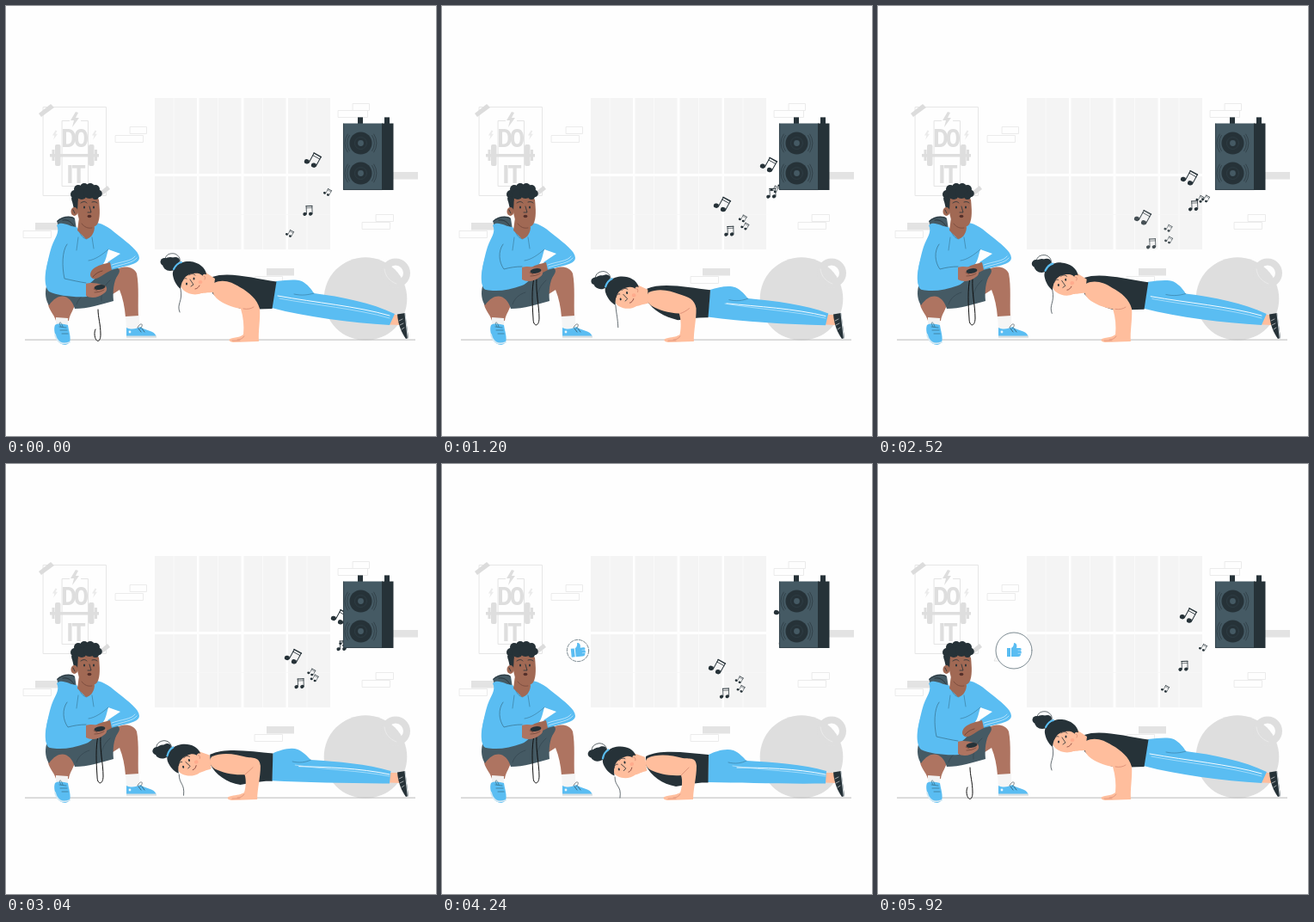
These frames come from a looping animation (500x500 px, 6 s). An HTML page with a canvas:

```html
<!DOCTYPE html>
<html lang="en">
<head>
<meta charset="utf-8">
<title>Workout</title>
<style>
html, body { margin: 0; width: 100%; height: 100%; overflow: hidden; background: #fefefe; }
canvas { display: block; width: 100vw; height: 100vh; }
</style>
</head>
<body>
<canvas id="stage"></canvas>
<script>
const LOOP = 6000, REP = 1100, REPS = 4, FIRST_REP = 395;
const BLUE = '#5abdf2', DARK = '#263238', SLATE = '#455a64', SKIN = '#ffbe9d';
const BROWN = '#ae7461', FACE = '#a16954', GREY = '#dedede', PALE = '#ebebeb';
const canvas = document.getElementById('stage');
const ctx = canvas.getContext('2d');

const lerp = (a, b, k) => a + (b - a) * k;
const clamp = v => Math.max(0, Math.min(1, v));
const ease = v => (1 - Math.cos(Math.PI * clamp(v))) / 2;

// value of a [time, value] track
function track(keys, t) {
  if (t <= keys[0][0]) return keys[0][1];
  for (let i = 1; i < keys.length; i++) {
    const [t0, v0] = keys[i - 1], [t1, v1] = keys[i];
    if (t <= t1) return lerp(v0, v1, (t - t0) / (t1 - t0));
  }
  return keys[keys.length - 1][1];
}

// blend two paths that share one structure
function mix(a, b, k) {
  const other = b.match(/-?[\d.]+/g);
  let i = 0;
  return a.replace(/-?[\d.]+/g, n => lerp(+n, +other[i++], k).toFixed(2));
}

function fill(d, color) {
  ctx.fillStyle = color;
  ctx.fill(new Path2D(d));
}

function line(d, color = DARK, w = 0.7) {
  ctx.strokeStyle = color;
  ctx.lineWidth = w;
  ctx.stroke(new Path2D(d));
}

function rect(x, y, w, h, color) {
  ctx.fillStyle = color;
  ctx.fillRect(x, y, w, h);
}

function box(x, y, w, h, color = PALE) {
  ctx.strokeStyle = color;
  ctx.lineWidth = 1;
  ctx.strokeRect(x + 0.5, y + 0.5, w, h);
}

function oval(x, y, rx, ry, color, rot = 0) {
  ctx.fillStyle = color;
  ctx.beginPath();
  ctx.ellipse(x, y, rx, ry, rot, 0, Math.PI * 2);
  ctx.fill();
}

function arc(x, y, r, color, w, a = 0, b = Math.PI * 2) {
  ctx.strokeStyle = color;
  ctx.lineWidth = w;
  ctx.beginPath();
  ctx.arc(x, y, r, a, b);
  ctx.stroke();
}

function at(x, y, rot, scale, draw) {
  ctx.save();
  ctx.translate(x, y);
  ctx.rotate(rot);
  ctx.scale(scale, scale);
  draw();
  ctx.restore();
}

function word(text, x, base, family) {
  ctx.font = `700 extra-condensed 28px ${family}, sans-serif`;
  ctx.letterSpacing = '-2.5px';
  ctx.textAlign = 'center';
  ctx.fillStyle = GREY;
  ctx.fillText(text, x, base);
  ctx.letterSpacing = '0px';
}

function bolt(x, y, s, color) {
  at(x, y, 0, s, () => fill('M1 -9 L-5 1 L-1 1 L-3 9 L5 -2 L1 -2 L4 -8 Z', color));
}

function room() {
  for (const y of [107, 198]) {
    const h = y < 150 ? 88 : 85;
    for (const x of [173, 224.5, 276.5, 328]) {
      rect(x, y, 49, h, '#f4f4f4');
      rect(x + 21.5, y, 1, h, '#fafafa');
    }
  }
  rect(173, 242, 204, 0.7, '#f8f8f8');
  for (const [x, y, w] of [[144, 140, 19], [127, 150, 32], [20, 261, 32], [403, 113, 19], [386, 121, 34],
    [430, 242, 20], [414, 251, 32], [289, 314, 32]]) box(x, y, w, 8);
  for (const [x, y, w] of [[34, 252, 27], [450, 193, 29], [303, 305, 32]]) rect(x, y, w, 8.5, '#e3e3e3');

  box(43, 117, 73, 103, '#e6e6e6');
  fill('M38 125 L52 114 L56 118 L41 129 Z', '#dcdcdc');
  fill('M108 217 L118 209 L121 213 L112 220 Z', '#dcdcdc');
  box(65, 133, 30, 76, '#e4e4e4');
  rect(74, 126, 13, 14, '#fefefe');
  bolt(80, 132, 1, GREY);
  bolt(57, 150, 0.6, PALE);
  bolt(103, 150, 0.6, PALE);
  word('DO', 79, 163.5, '"Noto Sans Mono"');
  word('IT', 80, 206, '"Open Sans"');
  rect(51, 172, 57, 3.5, GREY);
  for (const x of [57, 96]) {
    ctx.fillStyle = GREY;
    ctx.beginPath();
    ctx.roundRect(x, 161, 6.5, 25, 2);
    ctx.fill();
  }
  rect(53.5, 167, 3, 13, GREY);
  rect(103, 167, 3, 13, GREY);

  oval(418, 340.5, 48.3, 48.3, GREY);
  arc(453, 310.5, 13, GREY, 8);
  line('M440 306 C441 314 446 320 454 323', '#ececec', 0.8);
  rect(22, 387.6, 454, 1, '#b9b9b9');
}

function speaker() {
  rect(409, 129.4, 6, 9, DARK);
  rect(440, 129.4, 6, 9, DARK);
  rect(392, 136.5, 46, 77.5, SLATE);
  rect(437, 136.5, 13.5, 77.5, DARK);
  line('M392.4 137 V213.6 H437', DARK, 0.6);
  for (const y of [159.5, 194.5]) {
    oval(412.5, y, 13, 13, DARK);
    arc(412.5, y, 7, '#303f47', 0.8);
    oval(412.5, y, 3.4, 3.4, SLATE);
    for (const r of [16, 18.5]) {
      arc(412.5, y, r, DARK, 0.6, -0.6, 0.6);
      arc(412.5, y, r, DARK, 0.6, Math.PI - 0.6, Math.PI + 0.6);
    }
  }
}

function note(x, y, s, rot) {
  at(x, y, rot, s, () => {
    oval(-4.4, 5.2, 2.7, 2.4, DARK, -0.3);
    oval(3.8, 5.2, 2.7, 2.4, DARK, -0.3);
    line('M-2 5 V-6 M6.2 5 V-6', DARK, 0.9);
    line('M-2.2 -6 H6.4', DARK, 1.3);
    line('M-2 -3.4 H6.2', DARK, 0.7);
  });
}

// four notes drifting away from the speaker, placed by the largest one
function chord(x) {
  const u = (357 - x) / 54, y = 203 + 46 * u;
  ctx.globalAlpha = clamp((x - 281) / 32);
  note(x, y, 1.12, 0.5);
  note(x + 5 + 5 * u, y + 33 - 2 * u, 0.82, -0.04);
  note(x + 14 + 17 * u, y + 24 - 12 * u, 0.55, 0.5);
  note(x + 20 + 11 * u, y + 25 + 2 * u, 0.55, 0.5);
  ctx.globalAlpha = 1;
}

function openChord(x) {
  const y = 178 + (357 - x) * 0.78;
  ctx.globalAlpha = clamp((x - 285) / 35);
  note(x, y, 1.12, 0.5);
  note(x + 17, y + 38, 0.55, 0.5);
  note(x - 6, y + 59.5, 0.82, -0.04);
  note(x - 27, y + 86, 0.55, 0.5);
  ctx.globalAlpha = 1;
}

const chords = [
  [[40, 404], [1200, 326], [2040, 285], [2200, 276]],
  [[650, 404], [1200, 380], [2040, 334], [3040, 280]],
  [[1740, 404], [2040, 388], [3040, 334], [4040, 280]],
  [[2740, 404], [3040, 388], [4240, 320], [5080, 303], [5600, 280]],
  [[4100, 404], [4240, 396], [5080, 357], [5850, 280]]
];
const openTrack = [[5180, 404], [5920, 361], [6000, 357], [7100, 280]];

function music(t) {
  for (const keys of chords) {
    if (t >= keys[0][0] && t <= keys[keys.length - 1][0]) chord(track(keys, t));
  }
  const late = t < 3000 ? t + LOOP : t;
  if (late >= 5180 && late <= 7100) openChord(track(openTrack, late));
}

function coachHead() {
  fill('M85 246 L101 250 L103 258 C102 266 98 270 93 271 L83 261 Z', FACE);
  fill('M82 224 C90 219 102 219 108 225 C109 236 110 247 106 254 C101 260 92 257 87 252 C83 246 82 234 82 224 Z', FACE);
  fill('M76 223 L84 221 L83 238 L79 236 Z', DARK);
  oval(79.5, 239, 4, 5, FACE);
  for (const [x, y, r] of [[80, 219, 5], [84, 213, 5], [91, 211, 5], [98, 210.5, 4.5], [104, 213, 5],
    [107.5, 218, 4.3], [88, 219, 6], [97, 217, 7], [80, 225, 3.5], [104, 221, 4]]) oval(x, y, r, r, DARK);
  oval(91, 234, 1, 1.5, DARK);
  oval(102, 234, 1, 1.5, DARK);
  line('M87 229 C90 227 92 227 94 229 M100 228 C103 227 105 228 106 229 M97 233 L99 240 H95 M78 237 L80 241', DARK, 0.8);
  oval(97, 244.5, 2.4, 1.8, '#54302a');
  line('M88 253 C91 257 95 259 100 258', '#6f4337', 0.7);
}

function shoes() {
  fill('M58 362 L72 363 L72 373 L58 372 Z', '#f2f2f2');
  fill('M57 371 C61 368 68 370 72 371 C73 378 76 386 74 391 C70 396 63 394 60 389 C57 383 55 376 57 371 Z', BLUE);
  line('M57 382 C59 390 64 395 74 391', '#d5e9f3', 1.8);
  line('M62 373 L70 374 M63 377 L71 377 M65 381 L72 381 M64 373 C60 367 64 365 66 373', '#2f6075', 0.6);
  fill('M139 361 L155 360 L155 374 L140 376 Z', '#f5f5f5');
  fill('M140 374 C146 377 152 375 156 373 C162 378 173 377 174.5 384 H140 Z', BLUE);
  rect(140, 383.5, 35, 2.3, '#d7dfe3');
  line('M154 375 L157 379 M158 375 L161 379 M153 374 C157 366 161 371 156 375', DARK, 0.6);
  oval(144, 379, 1.4, 1.4, '#e9f6fd');
}

function coach(low) {
  const dy = 19 * low;
  fill('M49 344 C60 333 76 334 81 343 C80 352 74 358 73 366 L58 366 C56 358 48 352 49 344 Z', BROWN);
  fill('M122 311 C132 301 148 301 152 311 C155 326 153 345 154 362 H139 C138 350 136 340 132 330 L121 337 Z', BROWN);
  shoes();
  fill('M47 326 C60 329 75 327 92 318 L122 303 C130 303 135 306 130 313 C125 320 124 332 125 343 C111 347 95 352 80 352 C76 338 63 330 50 348 C46 342 45 334 47 326 Z', SLATE);
  line('M82 347 C84 340 90 335 97 333 M111 343 C110 333 114 325 121 319', '#34464f', 0.7);

  line(mix(
    'M107 316 C104 330 105 347 106 363 C106 374 113 373 113 363 C113 348 109 335 110 316',
    'M104 376 C103 378 103 380 103 382 C104 392 110 392 110 382 C110 370 107 362 107 353', low), '#111', 1);

  fill('M59 250 C65 244 76 243 80 247 L82 260 L62 259 Z', SLATE);
  line('M60 250 C66 245 75 244 79 247 M66 249 C72 248 76 251 79 256', DARK, 0.9);
  fill('M59 255 C65 249 74 257 82 257 C88 264 91 268 94 271 C99 267 101 258 104 252 C113 252 124 261 131 267 C142 276 155 285 155 293 C155 299 145 301 137 303 L122 307 L118 298 L133 288 L119 283 C117 290 116 296 113 300 C109 313 99 323 93 325 C77 331 60 333 49 329 C43 320 48 296 53 280 C57 269 63 263 59 255 Z', BLUE);
  fill(mix(
    'M52 288 C65 291 69 302 72 306 C79 304 87 303 94 303 L95 320 C83 325 64 332 51 330 C43 325 45 305 52 288 Z',
    'M52 288 C65 291 67 306 68 317 C77 319 86 321 94 322 L94 338 C80 339 60 337 50 332 C43 325 45 305 52 288 Z', low), BLUE);
  line(mix('M71 277 C65 285 66 298 72 306 C79 304 86 303 93 303', 'M71 277 C65 285 65 303 68 317 C77 319 86 321 93 322', low), '#31627a', 0.6);
  line('M119 283 C112 289 104 295 96 296 M85 261 C87 268 90 270 94 271 C98 268 101 262 101 257 M84 269 L82 284 M100 269 L102 282', '#387493', 0.6);
  line('M124 304 C135 300 148 299 152 293 M123 301 C134 297 146 297 150 291', '#d8f1ff', 0.7);

  fill('M121 298 C114 300 107 301 101 306 C97 310 97 315 101 317 C106 319 114 311 123 307 Z', FACE);
  line('M101 315 C104 311 108 309 112 308', '#5f392e', 0.7);
  fill(`M93 ${304 + dy} C98 ${302 + dy} 106 ${303 + dy} 111 ${305 + dy} C118 ${305 + dy} 119 ${312 + dy} 114 ${315 + dy} C107 ${321 + dy} 98 ${321 + dy} 93 ${318 + dy} Z`, BROWN);
  oval(109, 308 + dy, 6.5, 2.8, DARK, -0.15);
  line(`M103 ${314 + dy} C107 ${314 + dy} 111 ${313 + dy} 114 ${311 + dy} M102 ${310 + dy} L106 ${312 + dy}`, '#5f392e', 0.6);
  coachHead();
}

function athleteHead(d) {
  const x = lerp(218, 213, d), y = lerp(321, 351, d);
  at(x, y, -0.26 * Math.pow(d, 0.8), 1, () => {
    ctx.translate(-218, -321);
    line('M185 295 C185 289 191 287 196 288 C202 290 204 296 201 302', DARK, 0.7);
    oval(191, 300, 9, 8, DARK);
    oval(184.5, 297.5, 5, 4.5, DARK);
    oval(197, 296, 5, 4, DARK);
    fill('M203 311 C210 303 226 303 234 311 L243 317 L241 333 C234 333 231 334 227 334 C220 337 212 335 207 331 C202 327 200 318 203 311 Z', SKIN);
    fill('M194 313 C193 303 203 296 214 297 C224 298 232 304 233 312 L231 317 C228 311 223 310 218 311 C209 312 204 318 203 329 C198 325 195 319 194 313 Z', DARK);
    line('M195 306 C197 302 199 299 204 298', BLUE, 2.2);
    line('M205 320 C206 317 208 316 210 317 M213 313 C215 311 218 311 220 313 M214 318 L218 324 L215 326', DARK, 0.8);
    oval(210, 323, 1, 1.5, DARK);
    oval(218.5, 317, 1, 1.5, DARK);
    line('M220 329 C222 329 224 327 225 325', '#7d3b35', 0.8);
    oval(226, 321, 2.4, 2.1, '#ffab8d');
    oval(231, 315, 2.5, 3.2, SKIN);
    line('M230 314 C232 314 232 316 231 318', '#c4705e', 0.5);
  });
}

function athlete(d) {
  fill('M446 359 L458 359 L459 371 L446 370.5 Z', SKIN);
  fill('M455 358.5 L464 357 L468 386 L465 387 C460 380 456 371 455 358.5 Z', DARK);
  line('M464 357.5 L467.3 386.5', '#cfd6da', 1.1);
  line('M457 366 L461 364 M458 371 L462 369 M460 376 L463 374', '#f5f5f5', 0.6);

  fill(mix(
    'M314 320 C325 319 336 317 344 320 C351 324 355 329 358 334 C390 338 425 345 452 358 L446 371 C400 368 350 362 309 351 Z',
    'M310 338 C318 334 330 330 339 333 C346 336 350 341 354 345 C385 347 420 349 447 357 L446 371.5 C400 372 350 371 309 370 Z', d), BLUE);
  line(mix('M316 337 C360 345 408 349 446 360', 'M343 353 C372 353 412 354 446 361', d), '#f4fbff', 1);
  line(mix('M318 340 C360 348 408 352 446 363', 'M338 351 C372 356 412 357 446 363', d), '#d2effd', 0.6);
  line(mix('M335 335 C344 337 351 336 358 334', 'M333 347 C341 349 348 348 354 345', d), '#357699', 0.6);

  fill(mix(
    'M240 315 C258 308 290 317 314.5 320.5 L309.5 352 C298 352 287 353 277 353 C262 349 248 343 240 334 Z',
    'M237 340 C255 331 285 336 310 338 L309.5 370.5 C296 370 285 373 272 375 C256 372 243 363 237 350 Z', d), DARK);
  fill(mix(
    'M242 322 C252 317 263 321 272 327 C283 333 292 341 295 352 C296 364 293 378 294 390 L264 391 C258 390 258 387 264 386 C270 385 274 384 276 382 C277 372 276 362 273 352 C262 350 252 346 245 340 C239 334 239 328 242 322 Z',
    'M239 342 C252 336 268 339 280 342 C290 343 295 341 296 351 C296 364 292 378 292 390 L262 391 C256 390 256 387 262 386 C268 385 274 384 277 382 C279 377 280 368 278 362 C264 363 252 360 243 356 C236 352 235 346 239 342 Z', d), SKIN);
  line(mix('M276 352 C281 353 285 352 288 350', 'M278 362 C281 359 284 356 287 353', d), '#c97763', 0.6);
  line('M263 389 H272 M277 384 C275 387 272 388 269 388', '#c97763', 0.5);
  line(mix('M203 329 C206 344 198 346 202 356', 'M201 364 C201 376 209 373 207 388', d), DARK, 0.7);
  athleteHead(d);
}

function praise(t) {
  if (t < 4080) return;
  const s = track([[4080, 0], [4240, 0.6], [4500, 1]], t);
  oval(158, 217, 21 * s, 21 * s, '#fff');
  if (s > 0.8) {
    fill('M139 223 L135 229 L142 230 Z', '#fff');
    line('M138 223 L135 229 L141 229', '#d5d5d5', 0.6);
  }
  if (s < 0.75) ctx.setLineDash([4, 1.5]);
  arc(158, 217, 21 * s, SLATE, 0.7);
  ctx.setLineDash([]);
  at(158, 217, -0.25 * (1 - s), Math.min(1, s / 0.55), () => {
    fill('M-8 -3 H-4 V7 H-8 Z', BLUE);
    fill('M-3 -3 C-1 -4 0 -6 0 -9 C3 -9 4 -6 3 -3 H7 C9 -3 9 -1 8 0 C9 1 9 3 8 4 C8 6 7 7 5 7 H-3 Z', BLUE);
    line('M5 -0.2 H8 M5 3.3 H8', '#e4f5fe', 0.5);
  });
}

// depth of the push-up: a set of even repetitions, then a rest
function depth(t) {
  const reps = (t - FIRST_REP) / REP;
  return reps < 0 || reps > REPS ? 0 : (1 - Math.cos(reps * Math.PI * 2)) / 2;
}

function draw(t) {
  const ratio = window.devicePixelRatio || 1;
  const w = Math.round(innerWidth * ratio), h = Math.round(innerHeight * ratio);
  if (canvas.width !== w || canvas.height !== h) {
    canvas.width = w;
    canvas.height = h;
  }
  ctx.setTransform(w / 500, 0, 0, h / 500, 0, 0);
  ctx.lineCap = ctx.lineJoin = 'round';
  rect(0, 0, 500, 500, '#fefefe');
  room();
  music(t);
  speaker();
  athlete(depth(t));
  coach(1 - ease((t - 40) / 440) + ease((t - 5200) / 500));
  praise(t);
}

const start = performance.now();
function frame() {
  draw((performance.now() - start) % LOOP);
  requestAnimationFrame(frame);
}
frame();
</script>
</body>
</html>
```
